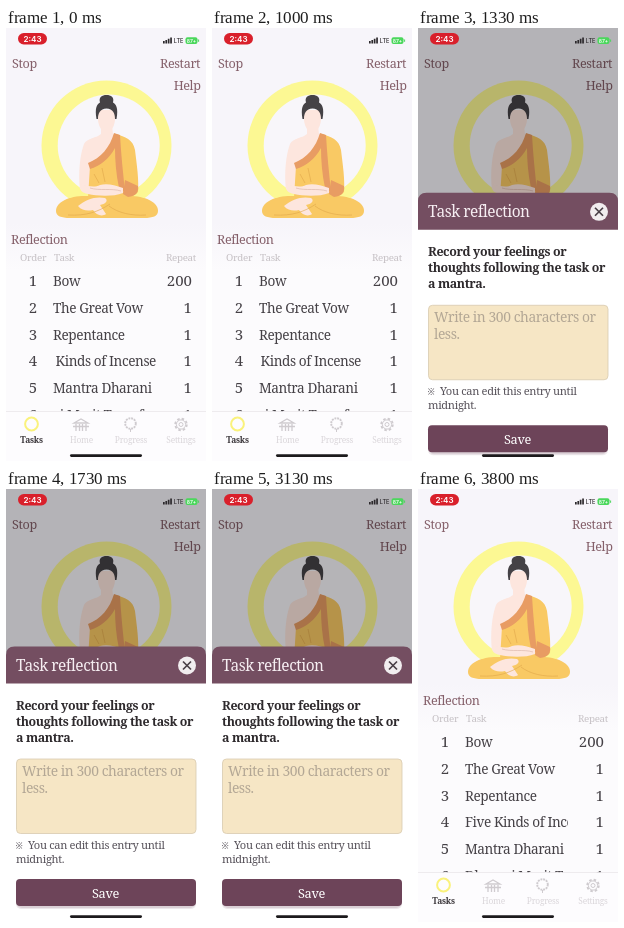
Recreate the animation shown at these times as an HTML page. Size 200x433 px, loop 3.87 s.

```html
<!DOCTYPE html>
<html lang="en">
<head>
<meta charset="utf-8">
<title>Task reflection</title>
<style>
  html, body { margin: 0; width: 100%; height: 100%; overflow: hidden; background: #f7f5fa; }
  svg { display: block; }
  #stage { width: 100%; height: 100%; }
  text { font-family: "Noto Serif", "Noto Sans CJK JP", serif; letter-spacing: -.03em; }
  .link { font-size: 12.6px; fill: #85606a; font-weight: 500; }
  .head { font-size: 9.8px; fill: #c6c1c5; }
  .row { font-size: 13.6px; fill: #454146; }
  .num { font-size: 15px; fill: #454146; letter-spacing: 0; }
  .tab { font-size: 8.4px; fill: #dad6da; }
  .active { fill: #3d393d; font-weight: 600; }
  .icon { fill: none; stroke: #cfcbcf; }
  .status text { font-family: Inter, Roboto, sans-serif; letter-spacing: 0; }
  .title { font-size: 15.4px; fill: #f6eef2; }
  .lead { font-size: 12.4px; fill: #2e2a2d; font-weight: 600; }
  .hint { font-size: 13.85px; fill: #b3a795; }
  .note { font-size: 11.1px; fill: #57525a; }
  .save { font-size: 12.8px; fill: #fff; }
  .mid { text-anchor: middle; }
  .end { text-anchor: end; }
  .skin { fill: #fde6de; }
  .robe { fill: #f9c964; }
  .trim { fill: #e89c63; }
</style>
</head>
<body>
<svg id="stage" viewBox="0 0 200 433" preserveAspectRatio="none">
  <linearGradient id="paper" x2="0" y2="1">
    <stop offset=".45" stop-color="#f7f5fa"/>
    <stop offset=".56" stop-color="#fcfbfd"/>
  </linearGradient>
  <rect width="200" height="433" fill="url(#paper)"/>

  <!-- seated figure -->
  <circle cx="100.5" cy="117.5" r="65" fill="#fcf893"/>
  <circle cx="102.7" cy="117.5" r="51" fill="#f8f6fa"/>
  <path class="robe" d="M50 183C50 175 60 169 76 168L126 168C142 169 152 175 152 183C152 188 147 190 138 190L64 190C55 190 50 188 50 183Z"/>
  <path class="skin" d="M95 98L106 98L107 106L118 112L96 142L84 142L85 160L74 161C72 146 74 126 78 116C81 110 91 110 95 106Z"/>
  <path class="robe" d="M84 138C96 130 105 120 110 107L122 112L129 167L82 170Z"/>
  <path class="robe" d="M110 106C119 109 127 111 129 122C131 138 133 152 132 164C128 169 122 170 114 168Z"/>
  <path class="trim" d="M108 105L114 107C115 126 117 144 119 164L113 160C110 146 109 132 109 120C103 131 94 138 84 141L82 135C95 130 104 119 108 105Z"/>
  <path class="trim" d="M119 152L132 158C133 164 130 168 122 169L117 166Z"/>
  <path class="skin" d="M74 156C82 158 88 160 94 157C101 155 108 157 117 160L117 165C107 169 91 168 82 166C76 165 73 162 74 156Z"/>
  <path class="skin" d="M72 178C80 171 90 168 99 170C103 173 99 176 94 177L100 186C96 189 90 187 87 182C82 183 76 183 72 178Z"/>
  <path fill="none" stroke="#e0a64a" stroke-width=".6" d="M62 187C80 188 92 184 104 176M140 187C126 188 112 185 103 178M88 146L93 155M96 140L99 154"/>
  <path fill="none" stroke="#d8b3a6" stroke-width=".6" d="M84 160C93 163 106 160 115 163"/>
  <path class="skin" d="M91.5 82C91 95 94 104 100.5 104C107 104 110 95 109.5 82Z"/>
  <path fill="#454246" d="M90.5 91C88.5 80 91 76 94 74.5C92.5 69 96 67 100.5 67C105 67 108.5 69 107 74.5C110 76 112.5 80 110.5 91L109 91C109 85 107 81 100.5 80.5C94 81 92 85 92 91Z"/>

  <text class="link" x="6" y="40">Stop</text>
  <text class="link end" x="194" y="40">Restart</text>
  <text class="link end" x="194.5" y="61.5">Help</text>
  <text class="link" x="5" y="215.5">Reflection</text>
  <text class="head" x="14" y="233">Order</text>
  <text class="head" x="48" y="233">Task</text>
  <text class="head end" x="190" y="233">Repeat</text>

  <g id="rows"></g>

  <!-- tab bar -->
  <path fill="#fdfcfe" d="M0 383.5H200V433H0Z"/>
  <path stroke="#e8e5e8" stroke-width=".7" d="M0 383.5H200"/>
  <circle cx="25.5" cy="396" r="6.4" fill="none" stroke="#faf27c" stroke-width="2"/>
  <path class="icon" stroke-width="1.3" d="M68 395L75 391L82 395ZM67 398.5H83M70 396V403M73.5 396V403M76.5 396V403M80 396V403"/>
  <circle class="icon" cx="124.5" cy="395.5" r="5.3" stroke-width="1.9" stroke-dasharray="1.9 .88"/>
  <path class="icon" d="M124.5 401V404"/>
  <circle class="icon" cx="175" cy="396.5" r="5.8" stroke-width="1.8" stroke-dasharray="2.5 2.05"/>
  <circle class="icon" cx="175" cy="396.5" r="4.6"/>
  <circle class="icon" cx="175" cy="396.5" r="2"/>
  <text class="tab active mid" x="25.5" y="414.5">Tasks</text>
  <text class="tab mid" x="75.5" y="414.5">Home</text>
  <text class="tab mid" x="125" y="414.5">Progress</text>
  <text class="tab mid" x="175" y="414.5">Settings</text>

  <rect id="dim" width="200" height="433"/>

  <!-- status bar -->
  <g class="status">
    <rect x="12" y="5" width="29" height="11.5" rx="5.75" fill="#d9202b"/>
    <text class="mid" x="26.5" y="13.7" font-size="8.1" font-weight="600" fill="#fff">2:43</text>
    <path fill="#2c292c" d="M157 13h1.7v2.5h-1.7zM159.4 12h1.7v3.5h-1.7zM161.8 10.7h1.7v4.8h-1.7zM164.2 9.4h1.7v6.1h-1.7z"/>
    <text x="167.8" y="15" font-size="5.6" font-weight="500" fill="#2c292c">LTE</text>
    <rect x="179.5" y="9.3" width="12" height="6.7" rx="2" fill="#4bd75c"/>
    <path stroke="#4bd75c" d="M192.6 11.5v2.3"/>
    <text class="mid" x="185.5" y="14.6" font-size="5" font-weight="600" fill="#fff">87+</text>
  </g>

  <!-- bottom sheet -->
  <g id="sheet">
    <path fill="#fff" d="M0 190H200V440H0Z"/>
    <path fill="#744e61" d="M0 194.5V166Q0 157.5 8.5 157.5H191.5Q200 157.5 200 166V194.5Z"/>
    <text class="title" x="10" y="181.5">Task reflection</text>
    <circle cx="181" cy="176.5" r="9" fill="#f1edef"/>
    <path stroke="#4a4047" stroke-width="1.7" d="M177 172.5l8 8m0-8l-8 8"/>
    <text class="lead" x="10" y="221">Record your feelings or</text>
    <text class="lead" x="10" y="237">thoughts following the task or</text>
    <text class="lead" x="10" y="253">a mantra.</text>
    <rect x="10.5" y="270" width="179.5" height="74.5" rx="4" fill="#f6e6c5" stroke="#d9cbb0" stroke-width=".8"/>
    <text class="hint" x="16" y="286.5">Write in 300 characters or</text>
    <text class="hint" x="16" y="303.5">less.</text>
    <text class="note" x="9.5" y="359.5" style="font-size:9px">※</text>
    <text class="note" x="22" y="360">You can edit this entry until</text>
    <text class="note" x="10" y="374">midnight.</text>
    <rect x="10" y="393" width="180" height="27" rx="5" fill="#6d4459" opacity=".12"/>
    <rect x="11" y="392" width="178" height="27" rx="5" fill="#6d4459" opacity=".14"/>
    <rect x="10" y="390" width="180" height="27" rx="4" fill="#6d4459"/>
    <text class="save mid" x="99.5" y="408.5">Save</text>
  </g>

  <rect x="64" y="426.3" width="72" height="2.6" rx="1.3" fill="#1c1a1c"/>
</svg>
<script>
const LOOP = 3870, TRAVEL = 276, NAME_WIDTH = 102;
const tasks = [
  ["Bow", 200], ["The Great Vow", 1], ["Repentance", 1],
  ["Five Kinds of Incense", 1], ["Mantra Dharani", 1], ["Dharani Merit Transfer", 1]
];
const $ = id => document.getElementById(id);

$("rows").innerHTML = tasks.map(([name, count], i) => {
  const y = 258 + i * 26.8;
  return `<text class="num mid" x="27" y="${y}">${i + 1}</text>
    <svg x="47" y="${y - 15}" width="${NAME_WIDTH + 1}" height="21" overflow="hidden">
      <text class="row name" y="15">${name}</text></svg>
    <text class="num end" x="186" y="${y}">${count}</text>`;
}).join("");
const names = [...document.querySelectorAll(".name")];

const progress = (t, from, to) => Math.min(1, Math.max(0, (t - from) / (to - from)));
const easeOut = p => 1 - (1 - p) ** 3;
const easeInOut = p => p < .5 ? 4 * p ** 3 : 1 - 4 * (1 - p) ** 3;

function draw(now) {
  const t = now % LOOP;

  // long names rest at their end, then restart while the sheet covers them
  for (const name of names) {
    const extra = Math.max(0, name.getComputedTextLength() - NAME_WIDTH);
    const shift = t < 2000 && extra ? extra - 1 + progress(t, 0, 100) : 0;
    name.setAttribute("x", -shift);
  }

  const shown = easeOut(progress(t, 1050, 1450)) - easeInOut(progress(t, 3200, 3562));
  $("sheet").setAttribute("transform", `translate(0 ${TRAVEL * (1 - shown)})`);
  $("sheet").setAttribute("visibility", shown > 0 ? "visible" : "hidden");
  $("dim").setAttribute("opacity", .27 * (progress(t, 1050, 1300) - progress(t, 3400, 3660)));

  requestAnimationFrame(draw);
}
requestAnimationFrame(draw);
</script>
</body>
</html>
```
